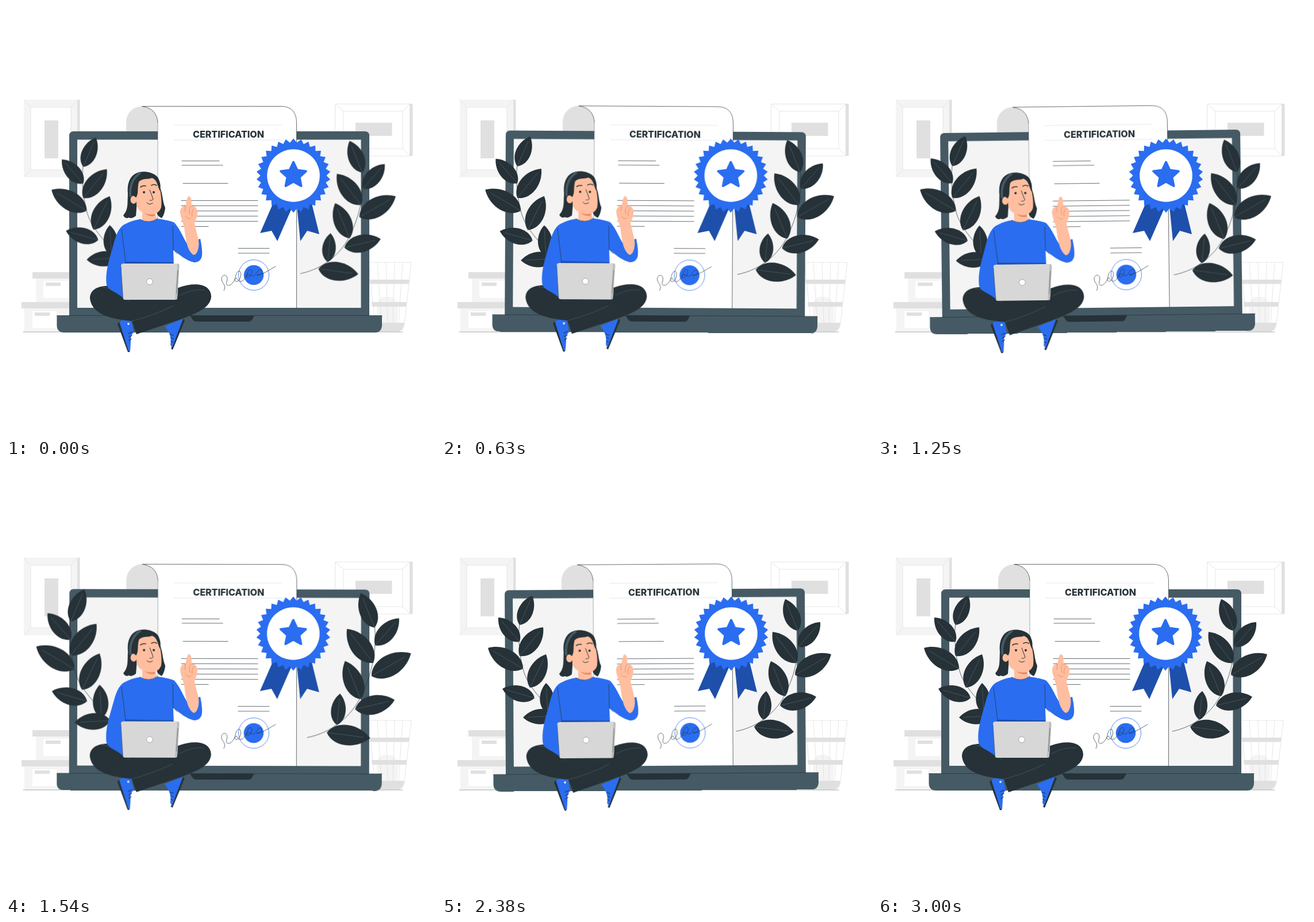
These frames come from a looping animation (748 by 748 pixels, 3.04 s). An HTML page:

```html
<!DOCTYPE html>
<html lang="en">
<head>
<meta charset="utf-8">
<title>Certification</title>
<style>
  html, body { margin: 0; width: 100%; height: 100%; overflow: hidden; background: #fff; }
  svg { display: block; width: 100vw; height: 100vh; }
  .tilt { transform-origin: 371.5px 388px; animation: tilt 3040ms linear infinite; }
  .beat { transform-origin: 378.5px 348px; animation: beat 3040ms ease-in-out infinite; }
  .shake { animation: shake 3040ms linear infinite; }
  @keyframes tilt {
    0%, 49.34%, 98.68%, 100% { transform: rotate(0deg); }
    12.34%, 61.68% { transform: rotate(1deg); }
    37.01%, 86.35% { transform: rotate(-1deg); }
  }
  @keyframes beat {
    0%, 1.8% { transform: scale(1.003); }
    12.83%, 48.5% { transform: scale(1.1); }
    23.85%, 37.5%, 59.5%, 100% { transform: scale(1); }
  }
  @keyframes shake {
    0%, 49.34%, 98.68%, 100% { transform: translateX(0); }
    4.93%, 44.41%, 54.28%, 93.75% { transform: translateX(-1px); }
    9.87%, 39.47%, 59.21%, 88.82% { transform: translateX(2px); }
    14.8%, 24.67%, 34.54%, 64.14%, 74.01%, 83.88% { transform: translateX(-4px); }
    19.74%, 29.61%, 69.08%, 78.95% { transform: translateX(4px); }
  }
  .pale { fill: #f4f4f4; }
  .grey { fill: #e0e0e0; }
  .white { fill: #fff; }
  .ink { fill: #263238; }
  .slate { fill: #455a64; }
  .blue { fill: #2a6df0; }
  .navy { fill: #1e4fab; }
  .skin { fill: #ffbe9f; }
  .thin { fill: none; stroke: #263238; stroke-width: .7; stroke-linecap: round; }
  .faint { fill: none; stroke: #e0e0e0; stroke-width: .8; }
  .vein { fill: none; stroke: #55666e; stroke-width: .6; }
  text { font: 800 16px Inter, "Open Sans", sans-serif; fill: #263238; text-anchor: middle; }
</style>
</head>
<body>
<svg viewBox="0 0 748 748">
  <g id="room">
    <path class="pale" d="M31 163H124V298H31Z"/>
    <path class="grey" d="M124 163H128.500V298H124Z"/>
    <path class="white" d="M43 176H113V285H43Z"/>
    <path class="faint" d="M31 163L43 176M124 163L113 176M31 298L43 285M124 298L113 285M43 176H113V285H43Z"/>
    <path class="grey" d="M67 199H91V265H67Z"/>

    <path class="faint" d="M572.500 170.500H703V261H572.500ZM587 183H690V248H587ZM572 170L587 183M703 170L690 183M572 261L587 248M703 261L690 248"/>
    <path class="grey" d="M702 170H707.500V261H702ZM608 203H671.500V226H608Z"/>

    <path class="pale" d="M52 474H116V515H52ZM32 526H112V567H32Z"/>
    <path class="white" d="M65 478H116V508H65ZM46 531H88V560H46Z"/>
    <path class="grey" d="M46 463H116V474H46ZM27 515H112V526H27ZM69 481H95V487H69ZM50 533H76V539H50Z"/>

    <path class="pale" d="M645 523C646 509 655 505 663 506C674 505 681 513 682 523L681 553H646Z"/>
    <path class="grey" d="M632 476H702L701 483.500H633ZM636 515H697L696 523H637ZM640 551H693Q691 566 681 566H640Z"/>
    <path class="faint" d="M631 446H705L693 553Q691 566 681 566H643ZM646 446L653 551M661 446L664 551M676 446L673 551M690 446L683 551"/>
    <path class="thin" d="M30 567H690" style="stroke-width:.4"/>
  </g>

  <g class="tilt">
    <path class="grey" d="M209 222V202A27.500 27.500 0 0 1 264 202V222Z"/>
    <path class="slate" d="M110 539V226Q110 218 118 218H624Q632 218 632 226V539Z"/>
    <path class="pale" d="M124 232.500H617.500V525H124Z"/>
    <path class="white" d="M264 525V202Q262 178 236.500 174.500H479Q505 175 505.500 203V525Z"/>
    <path class="thin" d="M264 202Q262 178 236.500 174.500H479Q505 175 505.500 203V525"/>
    <path class="thin" d="M264 202V525" style="stroke-width:.4"/>
    <path class="faint" d="M292 207H480M292 233H480"/>
    <path class="slate" d="M88.500 538.500H654V556Q653 568 642 568H101Q89 568 88.500 556Z"/>
    <path class="thin" d="M88.500 538.500H654"/>
    <path class="ink" d="M320 538.500H432L428 546Q426 549 422 549H332Q327 549 325 546Z"/>
    <text x="387" y="228.500">CERTIFICATION</text>
    <g id="copy"></g>
    <circle class="blue" cx="431" cy="468" r="17.300"/>
    <circle cx="431" cy="468" r="26.500" fill="none" stroke="#2a6df0" stroke-width=".8"/>
    <path class="thin" d="M379 495C385 485 374 482 375 474C377 464 388 468 384 479C381 492 396 486 399 472C401 458 411 458 408 471C404 485 393 478 401 473C409 488 418 472 421 462C425 454 431 460 426 468C419 478 414 467 424 467C434 476 435 460 442 459C449 460 444 470 436 468C446 468 458 459 469 453"/>
  </g>

  <g class="beat" id="plants">
    <path class="thin" d="M135 278C131 300 136 350 146 371C156 393 176 413 190 428"/>
    <path class="thin" d="M619 288C623 320 616 365 596 402C582 430 552 457 512 465"/>
  </g>

  <g class="shake">
    <path class="navy" d="M466 340L442 395L462 391L472 409L497 352ZM506 348L512 409L524 391L545 397L531 340Z"/>
    <polygon class="blue" id="teeth"/>
    <circle class="white" cx="500" cy="295" r="45.800"/>
    <polygon class="blue" id="star" stroke="#2a6df0" stroke-width="4" stroke-linejoin="round"/>
  </g>

  <g class="tilt">
    <!-- shoes -->
    <path class="ink" d="M194 553L198 548L216 594L215 602H212ZM308 544L311 547L290 598L287 596Z"/>
    <path class="blue" d="M197 549L217 542L222 568Q216 573 217 584L216 600H213ZM276 557L308 544L289 595L286 589Q289 572 276 557Z"/>
    <circle cx="213" cy="553" r="2" fill="#cfe0ff"/>
    <path class="thin" d="M213 570L219 567M214 576L219 573M214 582L218 579M286 571L291 573M287 577L291 579M287 583L290 585" style="stroke-width:1.200"/>

    <!-- trousers -->
    <path class="ink" d="M146 509C146 490 166 484 196 488L300 490C330 479 357 484 357 506C355 526 330 535 304 545L227 571L219 548C188 545 150 539 146 509Z"/>
    <path class="vein" d="M168 489C188 492 202 499 214 514M219 548Q252 540 290 522M345 494Q322 492 302 504"/>

    <!-- back hair and neck -->
    <path class="ink" d="M212 326C211 345 213 354 204 364Q207 371 214 368Q218 371 226 365L229 326ZM264 308C274 324 271 338 277 351Q276 362 271 369Q263 366 262 358Z"/>
    <path class="skin" d="M237 348V372Q249 380 262 370L259 356Z"/>
    <path d="M238 357Q247 364 259 362V365Q246 368 238 357Z" fill="#e8865f"/>

    <!-- sweater -->
    <path class="blue" d="M233 371Q249 380 263 370Q286 373 293 377C302 387 307 400 314 412L338 405Q342 424 341 434Q339 446 327 446C314 443 303 434 291 424L292 452H204V508C190 496 178 495 175 485C172 462 180 440 188 411Q195 384 208 379Q219 373 233 371Z"/>
    <path class="navy" d="M207 444.500L291 446V450H207Z"/>
    <path class="thin" d="M201 388L208 445M290 383L291 424M291 424L298 431M233 371Q249 380 263 370"/>

    <!-- raised hand -->
    <path class="skin" d="M303 357C304 350 308 348 312 348L315 335Q318 327 322 335L323 348C329 347 334 353 333 360C333 370 328 373 328 379L334 403C338 417 333 434 326 433C316 426 313 410 310 385C307 373 303 366 303 357Z"/>
    <path d="M312 348L311 358M322 348Q317 355 320 363M327 352Q322 358 324 366M312 366Q317 372 322 369" fill="none" stroke="#e8865f" stroke-width=".8"/>

    <!-- head -->
    <path class="skin" d="M226 318C224 300 250 294 262 301C268 312 272 338 270 350C267 361 255 364 246 362C236 360 228 354 227 345Z"/>
    <ellipse class="skin" cx="222" cy="337" rx="5.500" ry="7"/>
    <path class="ink" d="M213 333C208 306 218 290 236 288.500C250 287 264 294 266 302Q270 311 268 322C263 313 264 303 254 299C247 302 237 299 231 306C228 318 231 328 226 333Q220 327 217 333Z"/>
    <path d="M216.500 332C214 313 221 298 234 290" fill="none" stroke="#455a64" stroke-width="4"/>
    <path d="M234 315Q238 312 243 313M253 312Q258 309 262 312" fill="none" stroke="#263238" stroke-width="1.600" stroke-linecap="round"/>
    <circle class="ink" cx="240" cy="324" r="2"/>
    <circle class="ink" cx="257" cy="324" r="2"/>
    <path class="thin" d="M250 320L256 336Q254 339 250 338M245 342Q248 347 255 343" style="stroke-width:1"/>

    <!-- laptop on lap -->
    <path d="M200 452Q200 448 205 448H298Q302 448 301.500 453L298 508Q298 511 294 511H207Q204 511 203.500 508Z" fill="#d7d7d7"/>
    <path d="M298 448Q302 448 301.500 453L298 508Q298 511 294 511Z" fill="#bdbdbd"/>
    <path class="thin" d="M200 453L203.500 508M299 460L296.500 500" style="stroke-width:.5"/>
    <circle class="white" cx="250" cy="479.500" r="5.300" stroke="#777" stroke-width=".6"/>
  </g>
</svg>
<script>
  const byId = id => document.getElementById(id);
  const add = (parent, cls, d, transform = "") => {
    const path = document.createElementNS("http://www.w3.org/2000/svg", "path");
    path.setAttribute("class", cls);
    path.setAttribute("d", d);
    if (transform) path.setAttribute("transform", transform);
    parent.append(path);
  };

  // Written lines: left, right, height
  const rows = [[306, 371, 269.5], [306, 377, 277], [308, 386, 308.5], [305, 352, 383.5],
    [404, 458, 421.5], [404, 458, 430]];
  for (let i = 0; i < 5; i++) rows.push([305, 438, 338.5 + i * 9]);
  rows.forEach(([x1, x2, y]) => add(byId("copy"), "thin", `M${x1} ${y}H${x2}`));

  // Leaves: base point, then tip
  const leaves = [
    [135, 280, 157, 229], [135, 309, 98, 267], [135, 334, 176, 284], [141, 356, 80, 320],
    [153, 389, 181, 331], [161, 407, 105, 391], [184, 434, 181, 381], [198, 438, 141, 441],
    [619, 290, 597, 235], [620, 318, 658, 275], [617, 346, 575, 292], [614, 367, 677, 331],
    [597, 404, 572, 343], [588, 420, 651, 405], [559, 445, 564, 395], [543, 457, 612, 466]
  ];
  for (const [x, y, tipX, tipY] of leaves) {
    const dx = tipX - x, dy = tipY - y;
    const len = Math.hypot(dx, dy), w = len * 0.31;
    const turn = Math.atan2(dy, dx) * 180 / Math.PI;
    const place = `translate(${x} ${y}) rotate(${turn})`;
    const a = len * 0.18, b = len * 0.7;
    add(byId("plants"), "ink", `M0 0C${a} ${w} ${b} ${w} ${len} 0C${b} ${-w} ${a} ${-w} 0 0Z`, place);
    add(byId("plants"), "vein", `M0 0H${len * 0.85}`, place);
  }

  const zigzag = (id, tips, outer, inner, cx, cy) => {
    const points = Array.from({ length: tips * 2 }, (_, i) => {
      const r = i % 2 ? inner : outer;
      const angle = i * Math.PI / tips - Math.PI / 2;
      return [cx + r * Math.cos(angle), cy + r * Math.sin(angle)].join();
    });
    byId(id).setAttribute("points", points.join(" "));
  };
  zigzag("teeth", 30, 64.5, 57.5, 500, 295);
  zigzag("star", 5, 23, 11, 500, 294.5);
</script>
</body>
</html>
```
